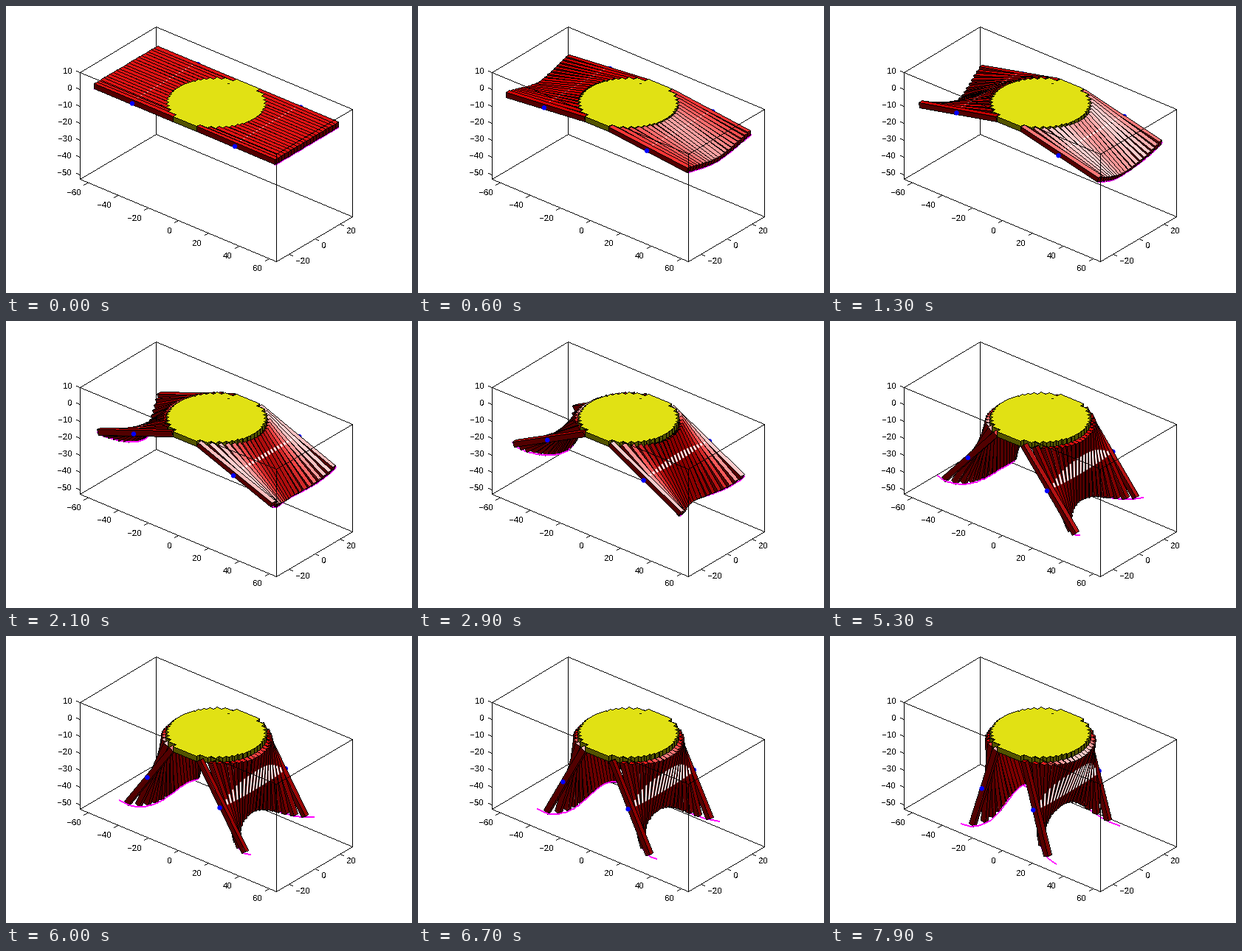
Write a matplotlib script that moves like this. It is 550x390 px and loops after 8000 ms.

```python
import numpy as np
import matplotlib.pyplot as plt
from matplotlib.animation import FuncAnimation
from matplotlib.collections import PolyCollection

W, H, DPI = 550, 390, 100
PX = 72 / DPI                       # one pixel in points
FRAMES, STEP_DEG = 80, 0.92

# Stool: a round seat cut into slats, legs hinged at the rim
R, HALF, THICK, N = 25.0, 60.0, 3.0, 20
SLAT = 2 * R / N
ROD_X, ROD_Y = 34.0, 26.0
Y_MID = R - SLAT * (np.arange(N) + 0.5)          # back to front
H_OUT = np.sqrt(R**2 - Y_MID[0]**2)

# Axis box
X, Y, Z0, Z1 = 65, 30, -53, 10

# Orthographic view, azimuth 40, elevation 30
SCALE, OX, OY = 2.67, 284.6, 138.0
AZ, EL = np.radians(40), np.radians(30)
VIEW = np.array([np.sin(AZ) * np.cos(EL), -np.cos(AZ) * np.cos(EL), np.sin(EL)])
AXES_2D = SCALE * np.array([
    [np.cos(AZ), np.sin(AZ) * np.sin(EL)],
    [np.sin(AZ), -np.cos(AZ) * np.sin(EL)],
    [0, -np.cos(EL)]])
LIGHT = np.array([0, 0.557, 0.83])
RED, YELLOW = np.array([1.0, 0, 0]), np.array([1.0, 1.0, 0])
BLACK, WHITE = (0, 0, 0, 1), (1, 1, 1, 1)
BLUE, MAGENTA = (0, 0, 1, 1), (1, 0, 1, 1)

plt.rcParams["font.family"] = "Liberation Sans"
plt.rcParams["text.antialiased"] = False


def project(pts):
    return np.asarray(pts, float) @ AXES_2D + (OX, OY)


def shade(color, n):
    diff = max(n @ LIGHT, 0)
    spec = 0.0
    if diff > 0:
        spec = 0.9 * max((2 * diff * n - LIGHT) @ VIEW, 0) ** 10
    return (*np.clip(color * (0.32 + 0.58 * diff) + spec, 0, 1), 1)


def stairs(a, b, width=1):
    """Outline of a crisp, unsmoothed pixel line from a to b."""
    a, b = np.rint(a), np.rint(b)
    major = int(abs(b[1] - a[1]) > abs(b[0] - a[0]))
    if a[major] > b[major]:
        a, b = b, a
    run = np.arange(a[major], b[major] + 1)
    slope = (b[1 - major] - a[1 - major]) / max(len(run) - 1, 1)
    rise = np.repeat(np.rint(a[1 - major] + slope * (run - run[0])), 2) - 0.5
    run = np.column_stack([run - 0.5, run + 0.5]).ravel()
    out = np.empty((2 * len(run), 2))
    out[:, major] = np.concatenate([run, run[::-1]])
    out[:, 1 - major] = np.concatenate([rise, rise[::-1] + width])
    return out


class Scene:
    """Back-to-front list of filled shapes."""

    def __init__(self):
        self.polys, self.fills = [], []

    def put(self, poly, fill):
        self.polys.append(poly)
        self.fills.append(fill)

    def face(self, pts, fill, edge=None):
        p = project(pts)
        self.put(p, fill)
        if edge:
            for a, b in zip(p, np.roll(p, -1, axis=0)):
                self.put(stairs(a, b), edge)

    def line(self, pts, color=BLACK, width=1):
        p = project(pts)
        for a, b in zip(p[:-1], p[1:]):
            self.put(stairs(a, b, width), color)

    def dot(self, p, r=3.4):
        a = np.arange(8) * np.pi / 4 + np.pi / 8
        self.put(project(p) + r * np.column_stack([np.cos(a), np.sin(a)]), BLUE)

    def prism(self, xz, y0, y1, color):
        """Convex outline in the xz plane, extruded along y."""
        xz = np.asarray(xz)
        mid = xz.mean(axis=0)
        for a, b in zip(xz, np.roll(xz, -1, axis=0)):
            n = np.array([b[1] - a[1], 0, a[0] - b[0]])
            n /= np.hypot(n[0], n[2])
            if n[[0, 2]] @ ((a + b) / 2 - mid) < 0:
                n = -n
            if n @ VIEW > 0:
                quad = [(a[0], y0, a[1]), (b[0], y0, b[1]),
                        (b[0], y1, b[1]), (a[0], y1, a[1])]
                self.face(quad, shade(color, n), BLACK)
        front = [(x, y0, z) for x, z in xz]
        self.face(front, shade(color, np.array([0, -1.0, 0])), BLACK)


def rod_at(theta):
    u, v = ROD_X - H_OUT, THICK / 2
    c, s = np.cos(theta), np.sin(theta)
    return H_OUT + u * c + v * s, -u * s + v * c


def leg_pose(h, rod):
    """Leg angle and the rod's distance along it."""
    dx, dz = rod[0] - h, rod[1]
    d = np.hypot(dx, dz)
    phi = np.arctan2(-dz, dx) + np.arcsin(THICK / 2 / d)
    return phi, np.sqrt(d**2 - (THICK / 2) ** 2)


def leg_point(h, phi, u, v, side):
    c, s = np.cos(phi), np.sin(phi)
    return side * (h + u * c + v * s), -u * s + v * c


def tip(y, rod, side):
    h = np.sqrt(max(R**2 - y**2, 0))
    x, z = leg_point(h, leg_pose(h, rod)[0], HALF - h, 0, side)
    return x, y, z


def draw_leg(sc, y, rod, side):
    h = np.sqrt(R**2 - y**2)
    phi, u = leg_pose(h, rod)
    y0, y1 = y - SLAT / 2, y + SLAT / 2
    trace = [tip(t, rod, side) for t in np.linspace(y1, y0, 5)]
    inside_seen = side < 0 and np.sin(phi) * VIEW[0] > np.cos(phi) * VIEW[2]
    if not inside_seen:
        sc.line(trace, MAGENTA, 2)
    corners = [(0, 0), (HALF - h, 0), (HALF - h, THICK), (0, THICK)]
    sc.prism([leg_point(h, phi, *uv, side) for uv in corners], y0, y1, RED)
    if inside_seen:
        sc.line(trace, MAGENTA, 2)
    normal = np.array([side * np.sin(phi), 0, np.cos(phi)])
    if normal @ VIEW > 0 and h > H_OUT + 0.01:
        # slot opened by the sliding rod
        a = leg_point(h, phi, ROD_X - h - 0.2, THICK, side)
        b = leg_point(h, phi, u + 0.2, THICK, side)
        w = SLAT * 0.22
        sc.face([(a[0], y - w, a[1]), (b[0], y - w, b[1]),
                 (b[0], y + w, b[1]), (a[0], y + w, a[1])], WHITE)


def draw_seat_top(sc):
    right, left = [], []
    for y in Y_MID:
        h = np.sqrt(R**2 - y**2)
        for t in (y + SLAT / 2, y - SLAT / 2):
            right.append((h, t, THICK))
            left.append((-h, t, THICK))
    sc.face(right + left[::-1], shade(YELLOW, np.array([0, 0, 1.0])), BLACK)
    sc.line([(-7.9, 18.6, THICK), (-7.3, 18.9, THICK)])


def front_edges(sc):
    corner = (X, -Y, Z1)
    for end in ((-X, -Y, Z1), (X, Y, Z1), (X, -Y, Z0)):
        sc.line([corner, end])


def build(theta):
    sc = Scene()
    rod = rod_at(theta)
    for side in (-1, 1):
        sc.dot((side * rod[0], ROD_Y, rod[1]))
    for y in Y_MID:
        h = np.sqrt(R**2 - y**2)
        seat = [(-h, 0), (h, 0), (h, THICK), (-h, THICK)]
        draw_leg(sc, y, rod, -1)
        folded = leg_pose(h, rod)[0] > np.pi / 2
        if folded:
            draw_leg(sc, y, rod, 1)
        sc.prism(seat, y - SLAT / 2, y + SLAT / 2, YELLOW)
        if not folded:
            draw_leg(sc, y, rod, 1)
    front_edges(sc)
    draw_seat_top(sc)
    for side in (-1, 1):
        sc.dot((side * rod[0], -ROD_Y, rod[1]))
    return sc


fig = plt.figure(figsize=(W / DPI, H / DPI), dpi=DPI, facecolor="white")
ax = fig.add_axes([0, 0, 1, 1])
ax.set_xlim(-0.5, W - 0.5)          # whole numbers are pixel centres
ax.set_ylim(H - 0.5, -0.5)
ax.axis("off")


def tick(sc, p, direction, label, dx, dy, ha):
    x, y = project(p)
    sc.put(stairs((x, y), (x + direction[0], y + direction[1])), BLACK)
    ax.text(x + dx, y + dy, str(label).replace("-", "\u2212"), fontsize=11.5 * PX,
            ha=ha, va="center_baseline")


frame = Scene()
for s in (-1, 1):
    for z in (Z0, Z1):
        frame.line([(-X, s * Y, z), (X, s * Y, z)])
        frame.line([(s * X, -Y, z), (s * X, Y, z)])
    for t in (-1, 1):
        frame.line([(s * X, t * Y, Z0), (s * X, t * Y, Z1)])
for v in range(-60, 61, 20):
    tick(frame, (v, -Y, Z0), (-5, 3), v, -9, 13, "right")
for v in (-20, 0, 20):
    tick(frame, (X, v, Z0), (5, 2), v, 9, 8.3, "left")
for v in range(-50, 11, 10):
    tick(frame, (-X, -Y, v), (-5, -2), v, -11, -2.6, "right")

ax.add_collection(PolyCollection(frame.polys, facecolors="black", linewidths=0,
                                 snap=False, zorder=1), autolim=False)
shapes = PolyCollection([], linewidths=0, snap=False, zorder=2)
ax.add_collection(shapes, autolim=False)


def update(i):
    sc = build(np.radians(STEP_DEG * i))
    shapes.set_verts(sc.polys)
    shapes.set_facecolor(sc.fills)
    return (shapes,)


anim = FuncAnimation(fig, update, frames=FRAMES, interval=100,
                     repeat=True, repeat_delay=0, blit=False)
plt.show()
```
